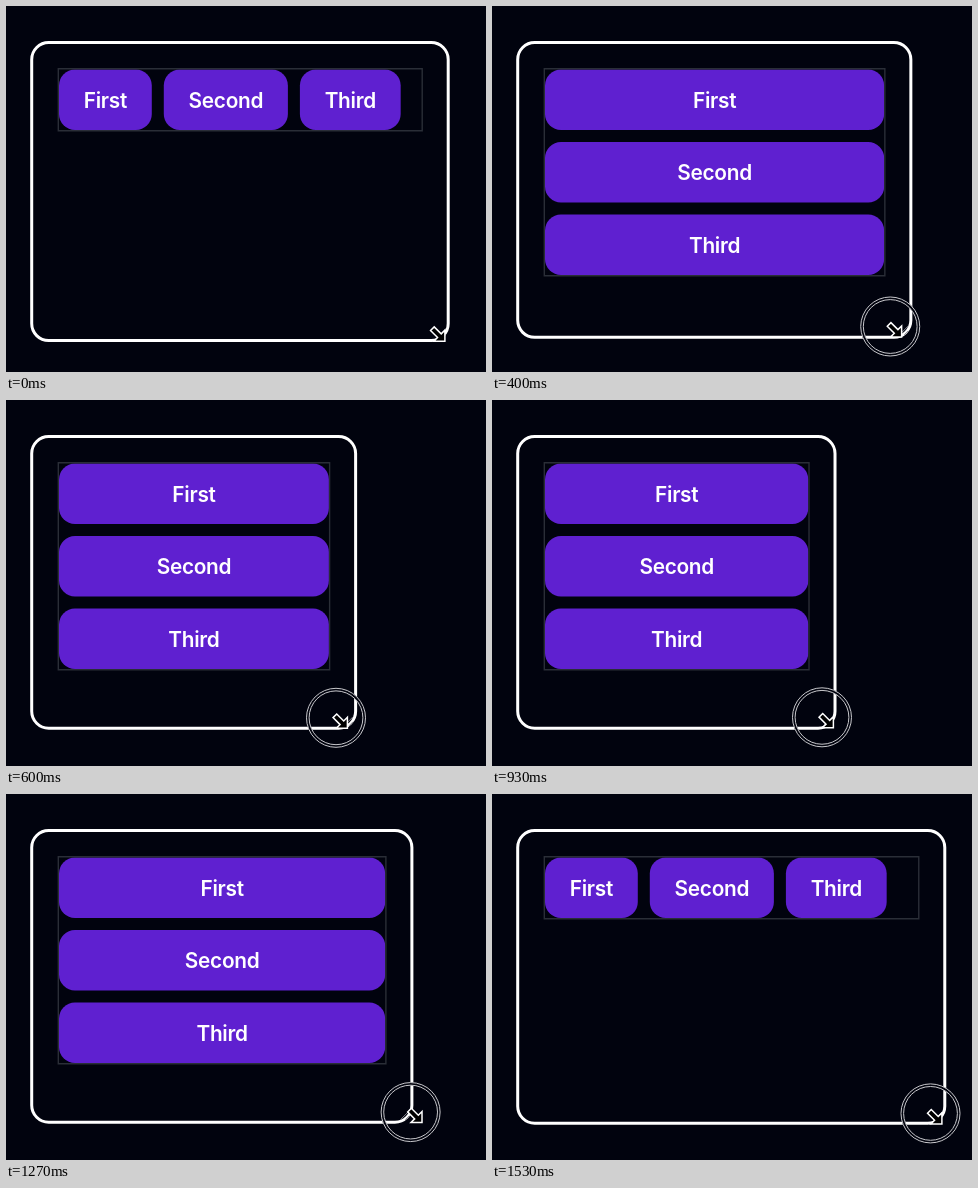
Recreate the animation shown at these times as an HTML page with a canvas. Size 480 by 366 pixels, loop 1740 ms.

```html
<!DOCTYPE html>
<html lang="en">
<head>
<meta charset="utf-8">
<title>Resizable flex container</title>
<style>
  html, body { margin: 0; height: 100%; overflow: hidden; background: #01030e; }
  canvas { display: block; }
</style>
</head>
<body>
<canvas id="stage" width="480" height="366"></canvas>
<script>
const ctx = document.getElementById('stage').getContext('2d');
const LOOP = 1740, LAST_STEP = 23;
const BG = '#01030e', PURPLE = '#5f20d0', EDGE = '#2a2e37', RING = '#c8c8cc';
const LEFT = 53, TOP = 63.5, HEIGHT = 60.5, GAP = 12, PADDING = 24.8;
const labels = ['First', 'Second', 'Third'];

// Drag of the pointer; one step is 1/15 s and speed is in pixels per step
const drag = [
  { step: 3, x: 427.5, y: 324.7, speed: 0 },
  { step: 4, x: 422, y: 324.2, speed: -10 },
  { step: 7, x: 378.5, y: 319.2, speed: -24 },
  { step: 9, x: 330, y: 317.8, speed: -5.5 },
  { step: 17, x: 348.5, y: 317.1, speed: 7.5 },
  { step: 20, x: 425, y: 318.4, speed: 5 },
  { step: 23, x: 438.5, y: 319.4, speed: 0 }
];

// Cubic Hermite interpolation between the drag points
function pointerAt(step) {
  const s = Math.max(drag[0].step, step);
  const i = Math.max(1, drag.findIndex(p => p.step >= s));
  const a = drag[i - 1], b = drag[i];
  const d = b.step - a.step, u = (s - a.step) / d, ease = u * u * (3 - 2 * u);
  return {
    x: a.x + (b.x - a.x) * ease + d * u * (1 - u) * (a.speed * (1 - u) - b.speed * u),
    y: a.y + (b.y - a.y) * ease
  };
}

function stroke(color, width) {
  ctx.strokeStyle = color;
  ctx.lineWidth = width;
  ctx.stroke();
}

function drawButton(label, x, y, w) {
  ctx.beginPath();
  ctx.roundRect(x, y, w, HEIGHT, 16);
  ctx.fillStyle = PURPLE;
  ctx.fill();
  ctx.fillStyle = '#fff';
  ctx.fillText(label, x + w / 2, y + 38);
}

// Buttons sit in a row while they fit, otherwise they stack at full width
function drawButtons(right) {
  const widths = labels.map(label => ctx.measureText(label).width + 2 * PADDING);
  const rowWidth = widths.reduce((sum, w) => sum + w + GAP, -GAP);
  const stacked = LEFT + rowWidth > right;
  let x = LEFT, y = TOP;
  labels.forEach((label, i) => {
    drawButton(label, x, y, stacked ? right - LEFT : widths[i]);
    if (stacked) y += HEIGHT + GAP;
    else x += widths[i] + GAP;
  });
  const height = stacked ? 3 * HEIGHT + 2 * GAP : HEIGHT;
  ctx.beginPath();
  ctx.rect(LEFT - 0.7, TOP - 0.7, right - LEFT + 1.4, height + 1.4);
  stroke(EDGE, 1.4);
}

function drawBox(right, bottom) {
  ctx.beginPath();
  ctx.roundRect(25.7, 36.5, right - 27.2, bottom - 38, 17);
  stroke('#fff', 3);
  drawButtons(right - 28.2);

  // Resize grip
  ctx.beginPath();
  for (const size of [10, 5]) {
    ctx.moveTo(right - 3 - size, bottom - 4);
    ctx.lineTo(right - 4, bottom - 3 - size);
  }
  stroke('#85858f', 1);
}

function drawRing(x, y) {
  for (const [r, color, width] of [[28.2, BG, 3], [29.5, RING, 1], [26.9, RING, 1]]) {
    ctx.beginPath();
    ctx.arc(x, y, r, 0, Math.PI * 2);
    stroke(color, width);
  }
}

// Diagonal resize arrow with its tip at x, y
function drawPointer(x, y) {
  ctx.save();
  ctx.translate(x, y);
  ctx.rotate(Math.PI / 4);
  ctx.beginPath();
  for (const side of [-1, 1]) {
    const half = [[0, 0], [-7.8, 7.8], [-7.8, 2.6], [-17.7, 2.6]];
    if (side > 0) half.reverse();
    for (const [px, py] of half) ctx.lineTo(px, py * side);
  }
  ctx.closePath();
  ctx.fillStyle = '#000';
  ctx.fill();
  stroke('#fff', 1.5);
  ctx.restore();
}

function draw(ms) {
  const step = Math.min(LAST_STEP, Math.floor((Math.floor(ms / 10) + 0.4) * 0.15));
  const pointer = pointerAt(step);
  const lagged = pointerAt(step - 0.4);   // the box trails the pointer

  ctx.fillStyle = BG;
  ctx.fillRect(0, 0, 480, 366);
  ctx.font = '600 20.8px Inter, sans-serif';
  ctx.letterSpacing = '-0.3px';
  ctx.textAlign = 'center';
  drawBox(lagged.x + 16.2, Math.max(329.7, lagged.y + 11.4));
  if (step > 0) drawRing(pointer.x, pointer.y);
  drawPointer(pointer.x + 11.4, pointer.y + 10.5);
}

function tick() {
  draw(performance.now() % LOOP);
  requestAnimationFrame(tick);
}
tick();
</script>
</body>
</html>
```
